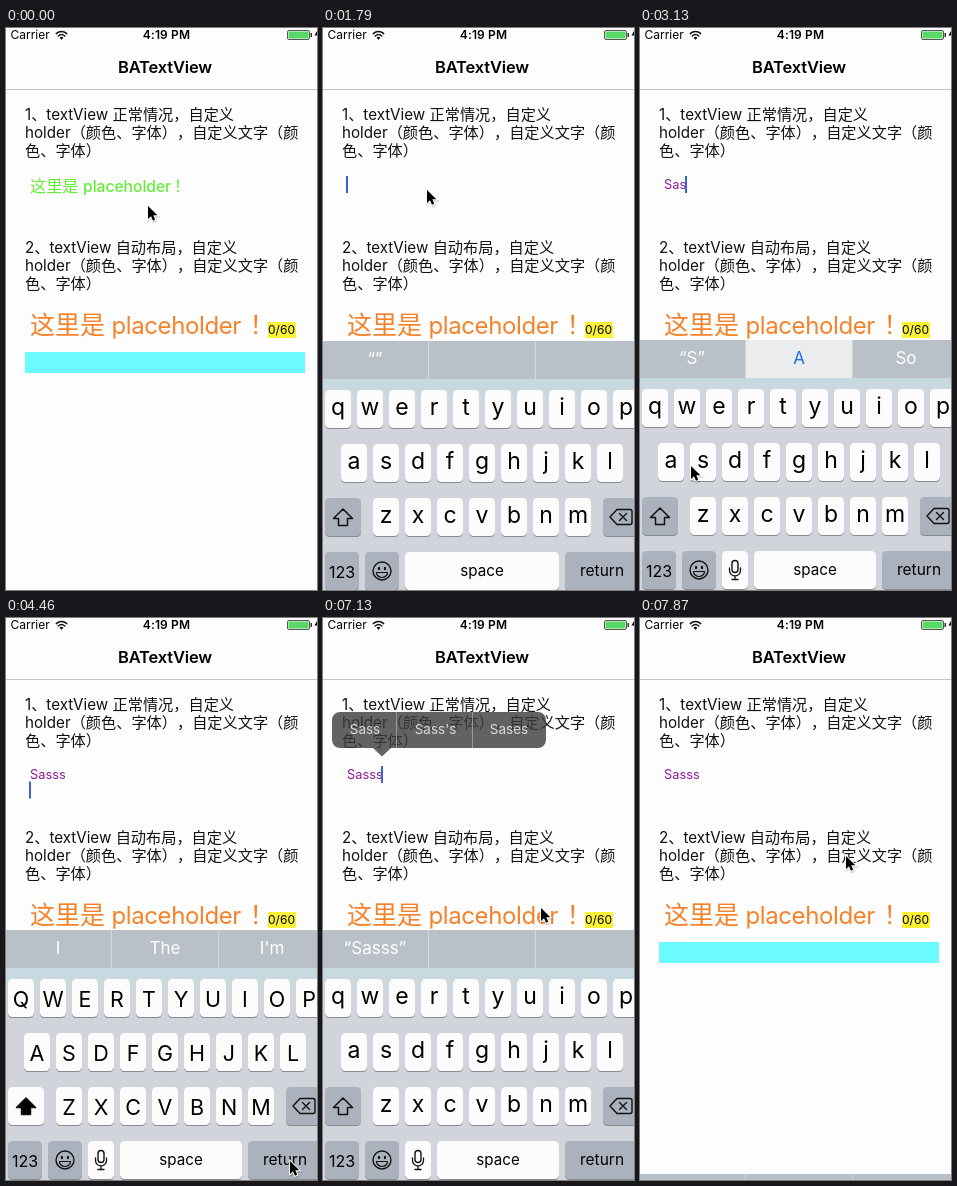
Animation of 311x562 px, one loop 8000 ms. Source, as an HTML page:

```html
<!DOCTYPE html>
<html lang="zh-CN">
<head>
<meta charset="utf-8">
<title>BATextView</title>
<style>
html, body { margin: 0; width: 311px; height: 562px; overflow: hidden; background: #fdfdfd; }
svg { display: block; font-family: Inter, "Noto Sans CJK SC", "Noto Sans CJK", sans-serif; text-spacing-trim: space-all; }
</style>
</head>
<body>
<svg id="stage" width="311" height="562" viewBox="0 0 311 562"></svg>
<script>
const stage = document.getElementById('stage');
const LOOP = 8000, TICKS = 54, TICK = LOOP / TICKS;
const KEYBOARD_TOP = 312, STAGE_H = 562;

const text = (x, y, size, str, attrs = '') =>
  `<text x="${x}" y="${y}" font-size="${size}" ${attrs}>${str}</text>`;
const mid = (x, y, size, str, attrs = '') => text(x, y, size, str, `text-anchor="middle" ${attrs}`);
const rect = (x, y, w, h, fill, r = 0) =>
  `<rect x="${x}" y="${y}" width="${w}" height="${h}" rx="${r}" fill="${fill}"/>`;
const path = (d, attrs) => `<path d="${d}" ${attrs}/>`;
const line = (width, color = '#111') =>
  `fill="none" stroke="${color}" stroke-width="${width}" stroke-linecap="round" stroke-linejoin="round"`;

// Last value of a [tick, value] list that has begun
const at = (list, n) => list.filter(e => e[0] <= n).pop()[1];

const pointer = [[0, 142, 178], [3, 142, 178], [5, 104, 162], [13, 104, 162], [16, 51, 438],
  [17, 51, 438], [19, 24, 438], [21, 51, 438], [24, 51, 438], [28, 284, 543], [34, 284, 543],
  [37, 298, 489], [39, 301, 487], [46, 301, 487], [48, 218, 290], [50, 206, 238], [54, 206, 238]];
const typed = [[0, ''], [17, 'S'], [19, 'Sa'], [21, 'Sas'], [22, 'Sass'], [24, 'Sasss']];
const starters = ['I', 'The', "I'm"];
const hints = [[0, ['“”']], [13, starters], [18, ['“S”', 'A', 'So']], [23, ['“Sass”']],
  [25, ['“Sasss”']], [30, starters], [46, ['“Sasss”']]];
const caretStops = [24, 32, 39.5, 46, 52.5, 59];
const caretOff = [15, 16, 27, 34, 38, 42, 43];

function pointerAt(n) {
  const i = pointer.findIndex(p => p[0] > n);
  const [a, b] = [pointer[i - 1], pointer[i]];
  const k = (n - a[0]) / (b[0] - a[0]);
  return [a[1] + (b[1] - a[1]) * k, a[2] + (b[2] - a[2]) * k];
}

// Critically damped spring: distance left after ms
function springLeft(ms) {
  const w = Math.max(0, ms) * 0.01826;
  return (1 + w) * Math.exp(-w);
}

function keyboardTop(n) {
  const left = n < 52 ? springLeft(n * TICK - 1348) : 1 - springLeft(n * TICK - 7545);
  return Math.round(KEYBOARD_TOP + (STAGE_H - KEYBOARD_TOP) * left);
}

function header() {
  return text(4.5, 11, 12, 'Carrier') +
    path('M50.3 5.6a7.6 7.6 0 0 1 10.4 0M52.2 8a5 5 0 0 1 6.6 0', line(1.5)) +
    path('M53.6 9.7a2.8 2.8 0 0 1 3.8 0L55.5 11.8z', '') +
    mid(160.5, 11, 12, '4:19 PM', 'font-weight="600" letter-spacing=".15"') +
    `<rect x="281.5" y="2.5" width="22" height="9" rx="1.5" fill="#fdfdfd" stroke="#555"/>` +
    rect(282.5, 3.5, 20, 7, '#58d867') + rect(304.5, 5, 1.5, 4, '#333') +
    path('M311 3L308.5 7.5H311z', '') +
    mid(159, 45, 16.5, 'BATextView', 'font-weight="600" letter-spacing="-.15"') +
    rect(0, 61, 311, 1, '#c4c4c6');
}

function paragraph(y, first) {
  return [first, 'holder（颜色、字体），自定义文字（颜', '色、字体）']
    .map((s, i) => text(19, y + i * 18, 15.2, s, 'fill="#111"')).join('');
}

function placeholder(y, cjk, latin, latinX, bangX, attrs, spacing = 0) {
  return `<g ${attrs}>` + text(24, y, cjk, '这里是') +
    text(latinX, y, latin, 'placeholder', `letter-spacing="${spacing}"`) +
    text(bangX, y, cjk, '！') + '</g>';
}

function field(n) {
  if (n < 9) return placeholder(164, 16.2, 15.6, 77, 168, 'fill="#62ee35" font-weight="500"');
  const str = at(typed, n);
  const secondLine = n >= 30 && n < 46;
  let out = text(24, 161, 12.8, str, 'fill="#8b1a95"');
  if (n < 52 && !caretOff.includes(n)) {
    out += secondLine ? rect(23, 163.5, 2, 17, '#3d62d8')
                      : rect(caretStops[str.length] - 1, 148, 2, 17, '#3d62d8');
  }
  return out;
}

const key = (x, y, w, fill = '#fcfcfc') =>
  rect(x, y + 1, w, 38, '#888b90', 4.5) + rect(x, y, w, 38, fill, 4.5);

function suggestions(n) {
  const words = at(hints, n);
  const picked = words[1] === 'A';
  return rect(0, 0, 311, 38, '#b9c0c8') +
    (picked ? rect(105, 0, 107, 38, '#eaecee') : '') +
    rect(105, 0, 1, 38, '#d0d6dc') + rect(212, 0, 1, 38, '#d0d6dc') +
    words.map((s, i) =>
      mid(52 + i * 107, 23.5, 17, s, `fill="${picked && i === 1 ? '#1c70e0' : '#fff'}"`)).join('');
}

function keyboard(n) {
  const top = keyboardTop(n);
  if (top >= STAGE_H) return '';
  const upper = (n >= 13 && n < 17) || (n >= 30 && n < 46);
  const mic = n >= 13, gray = '#abb2bd';
  let out = rect(0, 0, 320, 260, '#d1d5db') + suggestions(n);
  if (top < 330) out += rect(0, 38, 311, 30, 'url(#tint)');
  [['qwertyuiop', 2], ['asdfghjkl', 18], ['zxcvbnm', 50]].forEach(([row, left], r) => {
    const y = 49 + r * 54;
    [...row].forEach((c, i) => {
      const x = left + i * 32;
      out += key(x, y, 26) + (upper ? mid(x + 13, y + 27.5, 21.5, c.toUpperCase())
                                    : mid(x + 13, y + 25, 23, c));
    });
  });
  out += key(2, 157, 36, upper ? '#fcfcfc' : gray) +
    path('M20 168L29.5 177.5H24.5V184.5H15.5V177.5H10.5z',
      line(1.5) + (upper ? ' style="fill:#000"' : '')) +
    key(280, 157, 38, gray) +
    path('M287 176L294 168.5H307a2 2 0 0 1 2 2V181.5a2 2 0 0 1-2 2H294zM296.5 172.5l7 7m0-7l-7 7', line(1.4)) +
    key(2, 211, 34, gray) + mid(19, 236.5, 16, '123') +
    key(42, 211, 34, gray) + `<circle cx="59" cy="230" r="9" ${line(1.4)}/>` +
    `<ellipse cx="56" cy="227.5" rx="1.1" ry="1.7"/><ellipse cx="62" cy="227.5" rx="1.1" ry="1.7"/>` +
    path('M53.5 231.5H64.5A5.5 5 0 0 1 53.5 231.5z', line(1.2));
  if (mic) {
    out += key(82, 211, 26) + `<rect x="92" y="220.5" width="6" height="12" rx="3" ${line(1.4)}/>` +
      path('M89.5 228v2.5a5.5 5.5 0 0 0 11 0V228M95 236v3.5M92 239.5h6', line(1.3));
  }
  const spaceX = mic ? 114 : 82;
  out += key(spaceX, 211, 236 - spaceX) + mid((spaceX + 236) / 2, 235, 15.2, 'space') +
    key(242, 211, 76, gray) + mid(279, 235, 15.5, 'return');
  return `<g transform="translate(0 ${top})" fill="#000">${out}</g>`;
}

function menu(n) {
  if (n < 47 || n > 51) return '';
  return path('M17 94H215a8 8 0 0 1 8 8V122a8 8 0 0 1-8 8H68L59 138.5L50 130H17a8 8 0 0 1-8-8V102a8 8 0 0 1 8-8z',
      'fill="#3c3c3c" fill-opacity=".8"') +
    rect(73, 94, 1, 36, '#999') + rect(149, 94, 1, 36, '#999') +
    [[42, 'Sass'], [112.5, "Sass's"], [186, 'Sases']]
      .map(([x, s]) => mid(x, 116, 13.5, s, 'fill="#d8d8d8"')).join('');
}

function arrow(n) {
  const [x, y] = pointerAt(n);
  const d = 'M0 0V13L3 10.2L5 14.8L7.2 13.8L5.3 9.3H9.3z';
  return `<g transform="translate(${x} ${y})">` +
    path(d, 'transform="translate(.5 1.2)" fill="#000" stroke="#000" stroke-width="2.5" opacity=".15"') +
    path(d, 'stroke="#fff" stroke-width="1.8" paint-order="stroke"') + '</g>';
}

function draw(n) {
  return `<defs><linearGradient id="tint" x2="0" y2="1"><stop stop-color="#c6dae1"/>
    <stop offset="1" stop-color="#c6dae1" stop-opacity="0"/></linearGradient></defs>` +
    header() + paragraph(91.5, '1、textView 正常情况，自定义') + field(n) +
    paragraph(225, '2、textView 自动布局，自定义') +
    placeholder(306, 25, 24, 105.5, 243.5, 'fill="#f58229"', -0.4) +
    rect(262, 294, 28, 16, '#fbf235') + mid(275.5, 306, 12, '0/60') +
    rect(19, 324, 280, 21, '#6bfaff') +
    keyboard(n) + menu(n) + arrow(n);
}

let shown = -1;
function frame() {
  const n = Math.min(TICKS - 1, Math.floor(performance.now() % LOOP / TICK));
  if (n !== shown) stage.innerHTML = draw(shown = n);
  requestAnimationFrame(frame);
}
frame();
</script>
</body>
</html>
```
